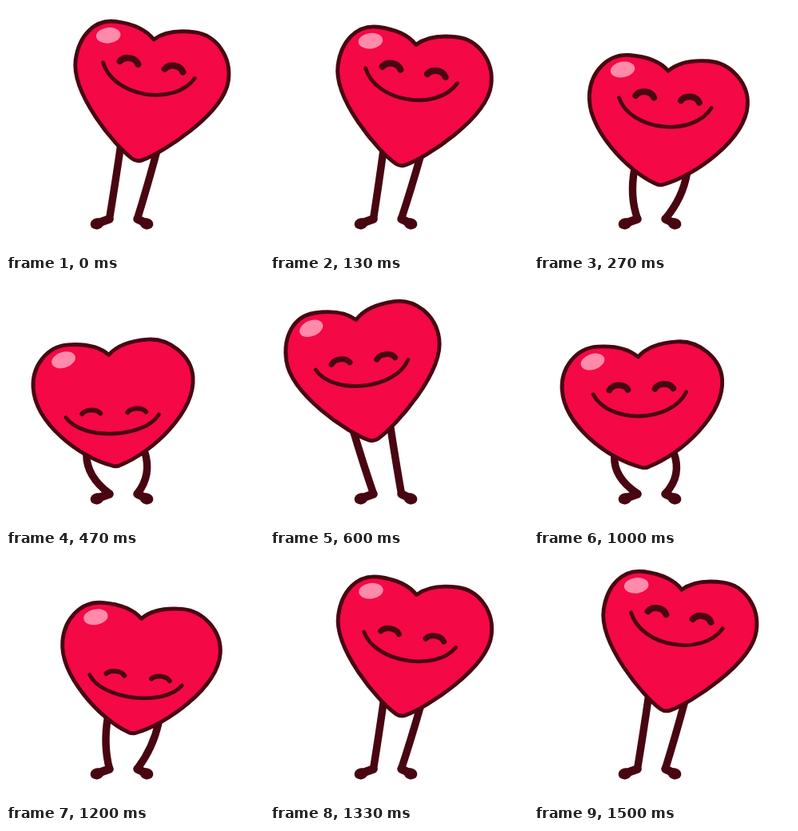
Animation of 323x309 px, one loop 1530 ms. Source, as an HTML page with a canvas:

```html
<!DOCTYPE html>
<html>
<head>
<meta charset="utf-8">
<title>Dancing heart</title>
<style>
  html, body { margin: 0; width: 100%; height: 100%; overflow: hidden; background: #fff; }
  canvas { display: block; }
</style>
</head>
<body>
<canvas id="stage" width="323" height="309"></canvas>
<script>
const ctx = document.getElementById('stage').getContext('2d');
const LOOP = 1530, TICKS = 46, HALF = 18;
const RED = '#f40845', DARK = '#480611', SHINE = '#ff8aa9';

// Progress from 0 to 1 over a span of frames
const progress = (frame, from, length) => Math.min(1, Math.max(0, (frame - from) / length));

// Each half swings to the other side: a dip on the way, then the face catches up
function poseAt(frame) {
  const dir = frame < HALF ? 1 : -1;
  const p = frame < HALF ? frame : frame - HALF;
  const swing = Math.PI * progress(p, 1.4, 15);
  const sway = dir * Math.cos(swing);
  const squash = Math.sin(swing) ** 3;
  const lag = Math.sin(Math.PI * progress(p, 5.3, 12.7)) ** 2;
  const hop = Math.max(0, Math.cos(2 * Math.PI * p / 18.5)) ** 2;
  return {
    x: 145.5 + 39.5 * sway,
    y: 48 + 60 * squash - 6 * hop,
    angle: (8.2 * sway - 0.4) * Math.PI / 180,
    w: 96.5 + 5 * squash,
    h: 153 - 18 * squash,
    face: 39 + 38.5 * lag,
    depth: 30 - 8 * lag,
    squash
  };
}

function stroke(width) {
  ctx.lineWidth = width;
  ctx.strokeStyle = DARK;
  ctx.stroke();
}

function ellipse(x, y, rx, ry, angle, color) {
  ctx.beginPath();
  ctx.ellipse(x, y, rx, ry, angle, 0, Math.PI * 2);
  ctx.fillStyle = color;
  ctx.fill();
}

function drawLeg(p, side, ankleX, toeX) {
  const cos = Math.cos(p.angle), sin = Math.sin(p.angle);
  const lx = side * (23 + 18 * p.squash), ly = p.h - 17;
  const hipX = p.x + lx * cos - ly * sin;
  const hipY = p.y + lx * sin + ly * cos;
  const bend = side * 26 * p.squash ** 2;
  ctx.beginPath();
  ctx.moveTo(hipX, hipY);
  ctx.quadraticCurveTo((hipX + ankleX) / 2 + bend, (hipY + 266) / 2 + 3, ankleX, 266);
  stroke(9.4);
  ctx.beginPath();
  ctx.moveTo(ankleX, 266.5);
  ctx.lineTo(toeX, 272);
  stroke(10.5);
  ellipse(toeX, 272.3, 8.5, 7, side * 0.2, DARK);
}

// One side of the heart, from the notch down to the tip or back up
function heartSide(side, { w, h, squash }) {
  const k = h / 152, edge = side * w + 3;
  const points = [
    [0, 0], [side * 10, -10], [side * 28, -16], [side * 50, -16],
    [side * 77, -16], [edge, 8], [edge, 38 * k],
    [edge, 80 * k + 8 * squash], [side * (30 + 20 * squash), h - 14], [side * 6, h - 1.5]
  ];
  if (side < 0) points.reverse();
  ctx.lineTo(...points[0]);
  for (let i = 1; i < points.length; i += 3) {
    ctx.bezierCurveTo(...points[i], ...points[i + 1], ...points[i + 2]);
  }
  if (side > 0) ctx.quadraticCurveTo(0, h + 1.5, -6, h - 1.5);
}

function drawBody(pose) {
  ctx.beginPath();
  heartSide(1, pose);
  heartSide(-1, pose);
  ctx.closePath();
  ctx.fillStyle = RED;
  ctx.fill();
  stroke(4.9);
  ellipse(-57, 2.5, 15.3, 9.8, -0.25, SHINE);
}

function drawEye(x, depth) {
  const y = -depth * 0.27, rise = depth * 0.2;
  ctx.beginPath();
  ctx.moveTo(x - 11.5, y + rise / 2);
  ctx.bezierCurveTo(x - 7, y - rise * 0.83, x + 7, y - rise * 0.83, x + 11.5, y + rise / 2);
  stroke(depth * 0.27);
}

function drawFace({ face, depth }) {
  ctx.translate(0, face);
  ctx.rotate(0.035);
  drawEye(-27, depth);
  drawEye(30, depth);
  ctx.beginPath();
  ctx.moveTo(-59, 0);
  ctx.bezierCurveTo(-40, depth * 4 / 3, 38, depth * 4 / 3, 57.5, 0);
  stroke(4.8);
}

function draw(pose) {
  ctx.fillStyle = '#fff';
  ctx.fillRect(0, 0, 323, 309);
  ctx.lineCap = ctx.lineJoin = 'round';
  drawLeg(pose, -1, 129.5, 114);
  drawLeg(pose, 1, 164.5, 176);
  ctx.save();
  ctx.translate(pose.x, pose.y);
  ctx.rotate(pose.angle);
  drawBody(pose);
  drawFace(pose);
  ctx.restore();
}

// Five drawings per six ticks: the first of each group is held twice as long
function frameAt(ms) {
  const tick = Math.floor((ms % LOOP) * TICKS / LOOP + 0.12) % TICKS;
  return Math.floor(tick / 6) * 5 + Math.max(0, tick % 6 - 1);
}

const start = performance.now();
function loop() {
  draw(poseAt(frameAt(performance.now() - start)));
  requestAnimationFrame(loop);
}
loop();
</script>
</body>
</html>
```
